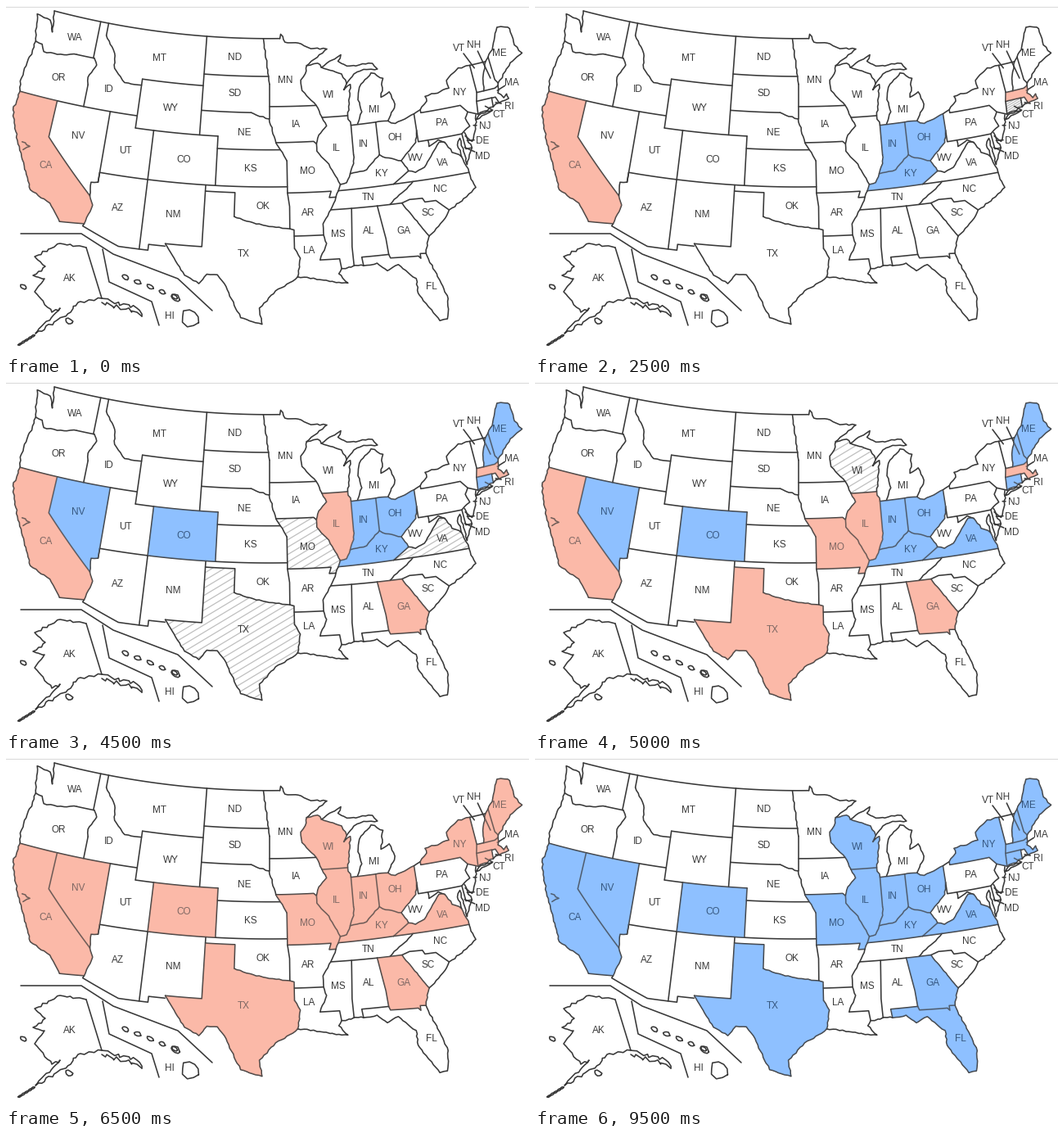
Animation, 639 px wide and 425 px high, one loop 9.6 s. Source, as a matplotlib script:

```python
import math
import random

import matplotlib.pyplot as plt
from matplotlib.animation import FuncAnimation
from matplotlib.collections import LineCollection
from matplotlib.patches import Polygon

W, H, DPI = 639, 425, 100
INK, CORAL, BLUE, GREY = "#383838", "#fbb9a8", "#8ec0ff", "#bfbfbf"
LABEL_INK = {CORAL: "#7d6763", BLUE: "#36577f"}
MERGER, RENAMING = 11, 14

random.seed(4)
arcs = []


def project(lon, lat):
    """Conic map projection from degrees to pixels."""
    angle = math.radians(0.558 * (lon + 96.5))
    radius = 1217 - 15.1 * (lat - 37)
    return 321.5 + radius * math.sin(angle), radius * math.cos(angle) - 996


def screen(x, y):
    return x, y


def draw(owners, points, rough=0.0, place=project):
    """Add a line shared by the states in owners, roughened between its points."""
    line = [place(*points[0])]
    for a, b in zip(points, points[1:]):
        pieces = max(1, round(math.dist(place(*a), place(*b)) / 4))
        for i in range(1, pieces + 1):
            t = i / pieces
            x, y = place(a[0] + (b[0] - a[0]) * t, a[1] + (b[1] - a[1]) * t)
            wobble = rough if i < pieces else 0
            line.append((x + random.uniform(-wobble, wobble), y + random.uniform(-wobble, wobble)))
    arcs.append((owners.split(), line))


def edge(owners, *points):
    draw(owners, points)


def parallel(lat, west, east, owners=""):
    draw(owners, [(west, lat), (east, lat)])


def meridian(lon, north, south, owners=""):
    draw(owners, [(lon, north), (lon, south)])


def river(owners, *points):
    draw(owners, points, 0.7)


def shore(owners, *points):
    draw(owners, points, 1.0)


def island(x, y, size, flat=0.6, tilt=0.5):
    ring = []
    for i in range(9):
        a, k = i * math.tau / 9, size * random.uniform(0.8, 1.15)
        u, v = k * math.cos(a), k * flat * math.sin(a)
        ring.append((x + u * math.cos(tilt) - v * math.sin(tilt),
                     y + u * math.sin(tilt) + v * math.cos(tilt)))
    arcs.append(([], ring + ring[:1]))


# Surveyed lines of the West and the Plains
parallel(49, -122.8, -95.2)
parallel(46, -119, -116.92)
parallel(45.94, -104.05, -96.56)
parallel(45, -111.05, -104.05)
parallel(43.5, -96.45, -91.22)
parallel(43, -104.05, -98.5)
parallel(42, -124.2, -120, "CA")
parallel(42, -120, -114.05, "NV")
parallel(42, -114.05, -111.05)
parallel(41, -111.05, -109.05)
parallel(41, -109.05, -102.05, "CO")
parallel(40, -102.05, -95.3)
parallel(37, -114.05, -109.05)
parallel(37, -109.05, -102.05, "CO")
parallel(37, -102.05, -94.62)
meridian(-117.03, 49, 46)
meridian(-117.03, 43.8, 42)
meridian(-116.05, 49, 48)
meridian(-114.05, 42, 36.2, "NV")
meridian(-114.05, 37, 36.2)
meridian(-111.05, 45, 41)
meridian(-109.05, 41, 37, "CO")
meridian(-109.05, 37, 31.33)
meridian(-104.05, 49, 41)
meridian(-102.05, 41, 37, "CO")
meridian(-103.04, 37, 36.5)
meridian(-96.45, 45.3, 42.5)

# Pacific side
shore("", (-122.8, 49), (-122.4, 47.3), (-123, 48.2), (-124.7, 48.4), (-124, 46.25))
river("", (-124, 46.25), (-123.2, 46.15), (-122.8, 45.6), (-121.2, 45.65), (-119, 46))
shore("", (-124, 46.25), (-124.5, 42.8), (-124.2, 42))
river("", (-116.92, 46), (-116.5, 45.5), (-117.2, 44.4), (-117.03, 43.8))
river("", (-116.05, 48), (-114.7, 46.7), (-114.4, 45.5), (-113, 44.5), (-111.05, 44.5))
shore("CA", (-124.2, 42), (-124.4, 40.4), (-123.7, 39), (-122.4, 37.2), (-121.9, 36.5),
      (-120.6, 34.5), (-118.4, 33.8), (-117.1, 32.5))
shore("", (-122.6, 38.1), (-121.7, 37.9), (-122.3, 37.5))
edge("CA", (-117.1, 32.5), (-114.7, 32.7))
river("CA", (-114.7, 32.7), (-114.2, 34.3), (-114.63, 35))
edge("CA NV", (-114.63, 35), (-120, 39), (-120, 42))
river("NV", (-114.05, 36.2), (-114.75, 36.1), (-114.63, 35))
edge("", (-114.7, 32.7), (-114.8, 32.5), (-111.07, 31.33), (-108.2, 31.33), (-108.2, 31.8), (-106.6, 31.8))

# Texas and the Missouri
edge("TX", (-106.6, 32), (-103.04, 32), (-103.04, 36.5), (-100, 36.5), (-100, 34.56))
river("TX", (-100, 34.56), (-98.1, 34.1), (-96.5, 33.8), (-94.45, 33.6))
edge("TX", (-94.45, 33.6), (-94.04, 33.5), (-94.04, 32))
river("TX", (-94.04, 32), (-93.5, 31.2), (-93.8, 29.7))
shore("TX", (-93.8, 29.7), (-95.9, 28.6), (-97.4, 27.2), (-97.15, 25.9))
river("TX", (-97.15, 25.9), (-99.1, 26.4), (-100.7, 29.1), (-101.4, 29.8), (-102.4, 29.8), (-103.1, 29),
      (-104.5, 29.6), (-106.6, 32))
edge("", (-94.45, 33.6), (-94.43, 35.4), (-94.62, 36.5))
river("", (-98.5, 43), (-97.9, 42.8), (-96.5, 42.5), (-95.77, 40.58))
river("MO", (-95.77, 40.58), (-95.3, 40), (-94.62, 39.1))
meridian(-94.62, 39.1, 36.5, "MO")
river("", (-96.45, 45.3), (-96.56, 45.94), (-97.2, 49))
edge("MO", (-95.77, 40.58), (-91.7, 40.6), (-91.4, 40.4))

# Mississippi
shore("", (-95.2, 49), (-95.1, 49.35), (-94.6, 48.7), (-93, 48.6), (-91.5, 48.1), (-89.6, 48), (-92.1, 46.75))
river("WI", (-92.1, 46.75), (-92.3, 46.1), (-92.85, 45.6), (-92.75, 44.75), (-91.22, 43.5), (-90.64, 42.5))
river("IL", (-90.64, 42.5), (-90.2, 41.8), (-91.1, 41.1), (-91.4, 40.4))
river("MO IL", (-91.4, 40.4), (-91.4, 39.8), (-90.2, 38.7), (-89.15, 37))
river("KY MO", (-89.15, 37), (-89.4, 36.5))
river("MO", (-89.4, 36.5), (-89.7, 36))
edge("MO", (-94.62, 36.5), (-90.15, 36.5), (-90.37, 36), (-89.7, 36))
river("", (-89.7, 36), (-90.3, 35), (-91.15, 33.9), (-91.15, 33), (-90.9, 32.3), (-91.6, 31))
parallel(33, -94.04, -91.15)
edge("", (-91.6, 31), (-89.73, 31), (-89.6, 30.2))
shore("", (-93.8, 29.7), (-92.3, 29.55), (-90.2, 29.1), (-89.1, 29), (-89.9, 29.8), (-89.6, 30.2),
      (-88, 30.35), (-87.5, 30.3))

# Great Lakes and the Ohio
shore("WI", (-92.1, 46.75), (-90.8, 46.9), (-90.4, 46.55))
river("WI", (-90.4, 46.55), (-88.1, 45.9), (-87.6, 45.1))
shore("WI", (-87.6, 45.1), (-88, 44.6), (-87.2, 45), (-87.8, 42.5))
shore("", (-90.4, 46.55), (-88, 47.45), (-88.4, 46.95), (-87.4, 46.5), (-84.4, 46.5), (-83.9, 46),
      (-85.5, 46.1), (-86.7, 45.8), (-87.6, 45.1))
shore("", (-86.8, 41.76), (-86.2, 42.7), (-86.5, 43.7), (-86.2, 44.7), (-84.7, 45.75), (-83.4, 45.2),
      (-83.9, 43.7), (-82.9, 44.05), (-82.45, 43), (-83.45, 41.73))
parallel(42.5, -90.64, -87.8, "WI IL")
shore("IL", (-87.8, 42.5), (-87.53, 41.7))
meridian(-87.53, 41.7, 39.3, "IL IN")
river("IL IN", (-87.53, 39.3), (-87.6, 38.6), (-88.05, 37.8))
river("IL KY", (-88.05, 37.8), (-88.5, 37.1), (-89.15, 37))
edge("IN", (-87.53, 41.7), (-84.8, 41.75))
meridian(-84.8, 41.75, 39.1, "IN OH")
river("IN KY", (-88.05, 37.8), (-86.3, 38), (-85.5, 38.6), (-84.8, 39.1))
river("OH KY", (-84.8, 39.1), (-84.2, 38.8), (-82.6, 38.4))
shore("OH", (-84.8, 41.75), (-83.45, 41.73), (-82.7, 41.45), (-80.52, 42))
meridian(-80.52, 42, 40.64, "OH")
river("OH", (-80.52, 40.64), (-80.8, 39.7), (-81.8, 39), (-82.6, 38.4))

# South
river("KY", (-82.6, 38.4), (-82, 37.5))
edge("KY VA", (-82, 37.5), (-83.7, 36.6))
edge("KY", (-89.4, 36.5), (-83.7, 36.6))
edge("VA", (-83.7, 36.6), (-81.7, 36.6), (-75.87, 36.55))
river("", (-84.32, 35), (-83, 35.8), (-81.7, 36.6))
parallel(35, -90.3, -85.6)
parallel(35, -85.6, -83.1, "GA")
edge("", (-88.2, 35), (-88.45, 31.9), (-88.4, 30.35))
edge("GA", (-85.6, 35), (-85.1, 32.3), (-85, 31))
edge("FL", (-85, 31), (-87.6, 31), (-87.5, 30.3))
edge("GA FL", (-85, 31), (-84.87, 30.7), (-82.2, 30.57), (-82, 30.36), (-82, 30.75), (-81.45, 30.7))
river("GA", (-83.1, 35), (-81.4, 32.7), (-80.9, 32.05))
shore("GA", (-80.9, 32.05), (-81.45, 30.7))
shore("FL", (-81.45, 30.7), (-80.55, 28.4), (-80.05, 26.8), (-80.4, 25.2), (-81.1, 25.15), (-82.7, 27.6),
      (-82.7, 28.8), (-84.2, 30.1), (-85.3, 29.7), (-86.2, 30.4), (-87.5, 30.3))
edge("", (-83.1, 35), (-82.3, 35.2), (-81, 35.15), (-80.8, 34.82), (-79.7, 34.8), (-78.55, 33.87))
shore("", (-75.87, 36.55), (-75.5, 35.25), (-76.6, 34.65), (-78.55, 33.87), (-79.3, 33.1), (-80.9, 32.05))

# Chesapeake to New York
shore("VA", (-75.87, 36.55), (-76.3, 37.9), (-77.2, 38.4), (-77.75, 39.3))
river("VA", (-77.75, 39.3), (-78.35, 39.4), (-80.3, 37.6), (-81.3, 37.3), (-82, 37.5))
river("", (-77.75, 39.3), (-78.4, 39.6), (-79.48, 39.2), (-79.48, 39.72))
edge("", (-80.52, 40.64), (-80.52, 39.72), (-75.8, 39.72), (-75.7, 38.46), (-75.05, 38.45))
shore("", (-75.5, 39.8), (-75.05, 38.45), (-75.9, 37.2), (-76.1, 39.4), (-76.5, 38.9), (-76.3, 37.9))
river("", (-75.8, 39.72), (-74.8, 40.2), (-75.1, 40.9), (-74.7, 41.36))
shore("", (-80.52, 42), (-79.76, 42.25))
edge("NY", (-79.76, 42.25), (-79.76, 42), (-75.35, 42), (-74.7, 41.36), (-73.65, 41))
shore("", (-73.9, 41), (-74, 40.4), (-74.9, 38.95), (-75.5, 39.5))
shore("NY", (-79.76, 42.25), (-78.9, 42.85), (-79, 43.25), (-76.2, 43.55), (-76.3, 44.2), (-74.7, 45), (-73.35, 45))
shore("", (-74, 40.6), (-72, 41.05), (-73.6, 40.9), (-74, 40.6))

# New England
edge("NY", (-73.35, 45), (-73.26, 42.75))
edge("NY MA", (-73.26, 42.75), (-73.5, 42.05))
edge("NY CT", (-73.5, 42.05), (-73.65, 41))
parallel(45, -73.35, -71.5)
river("NH", (-71.5, 45), (-72.1, 44), (-72.46, 42.73))
edge("NH", (-71.5, 45), (-71.08, 45.3))
edge("NH ME", (-71.08, 45.3), (-70.97, 43.4), (-70.7, 43.07))
shore("NH", (-70.7, 43.07), (-70.8, 42.87))
shore("ME", (-71.08, 45.3), (-70.4, 45.8), (-69.2, 47.45), (-68.3, 47.3), (-67.8, 47.07), (-67.8, 45.7),
      (-67.2, 44.9), (-68.8, 44.4), (-70.7, 43.07))
parallel(42.73, -73.26, -72.46, "MA")
edge("MA NH", (-72.46, 42.73), (-71.2, 42.73), (-70.8, 42.87))
shore("MA", (-70.8, 42.87), (-71, 42.3), (-70.5, 41.8), (-70.1, 42.05), (-70, 41.65), (-71.13, 41.5))
edge("MA", (-71.13, 41.5), (-71.38, 42.02), (-71.8, 42.02))
parallel(42.04, -71.8, -73.5, "MA CT")
edge("CT", (-71.8, 42.02), (-71.86, 41.3))
shore("CT", (-71.86, 41.3), (-73.65, 41))
shore("", (-71.86, 41.3), (-71.13, 41.5))

# Insets
draw("", [(18, 278), (92, 278), (131, 303), (210, 333), (252, 372)], place=screen)
draw("", [(118, 297), (126, 337), (178, 361), (187, 390)], place=screen)
draw("", [(98, 295), (117, 357)], place=screen)
draw("", [(98, 295), (66, 290), (35, 306), (48, 318), (33, 329), (47, 333), (35, 349), (56, 374), (66, 369),
          (36, 400), (79, 374), (88, 362), (117, 357)], 1.5, screen)
for drop in (0, 5):
    draw("", [(117, 357 + drop), (160, 369 + drop), (166, 379)], 2.5, screen)
for k in range(5):
    island(17 + 4 * k, 413 - 2.5 * k, 2.5, 0.4, -0.5)
    island(146 + 15 * k, 331 + 6 * k, 4.5 - 0.2 * k)
for place in ((21, 343, 4), (77, 385, 5), (207, 356, 6), (225, 381, 11, 0.9)):
    island(*place)

LABELS = dict(
    WA=(84, 37), OR=(64, 86), ID=(126, 100), MT=(187, 62), WY=(201, 123), NV=(88, 157), CA=(49, 193),
    UT=(146, 175), CO=(217, 186), AZ=(137, 245), NM=(204, 254), ND=(280, 61), SD=(280, 105),
    NE=(291, 153), KS=(299, 197), OK=(314, 243), TX=(290, 302), MN=(341, 89), IA=(354, 144),
    MO=(368, 200), AR=(369, 252), LA=(370, 298), WI=(394, 107), IL=(404, 172), MI=(450, 125),
    IN=(437, 168), OH=(475, 159), KY=(459, 203), TN=(443, 232), MS=(406, 278), AL=(443, 273),
    GA=(486, 273), FL=(520, 341), SC=(516, 251), NC=(531, 222), VA=(533, 190), WV=(500, 184),
    PA=(532, 141), NY=(554, 104), VT=(553, 50), NH=(572, 46), ME=(603, 56), MA=(618, 92),
    RI=(615, 121), CT=(602, 131), NJ=(585, 146), DE=(582, 163), MD=(582, 182), AK=(78, 332), HI=(200, 377))
POINTERS = dict(VT=(-72.9, 44.7), NH=(-71.4, 43.6), MA=(-71, 42.5), RI=(-71.5, 41.6), CT=(-72.7, 41.5),
                NJ=(-74.4, 40.2), DE=(-75.4, 39.1), MD=(-75.8, 38.6))
for name, spot in POINTERS.items():
    (x, y), (tx, ty) = LABELS[name], project(*spot)
    t = 10 / math.dist((x, y), (tx, ty))
    draw("", [(x + (tx - x) * t, y + (ty - y) * t), (tx, ty)], place=screen)

# states, step when hatched, step when coloured, first colour
SCHEDULE = [
    ("CA", 0, 0, CORAL), ("IN", 1, 1, BLUE), ("KY", 1, 2, BLUE), ("OH", 3, 4, BLUE),
    ("MA", 4, 5, CORAL), ("CT", 5, 6, BLUE), ("NH CO NV", 6, 7, BLUE), ("ME", 7, 8, BLUE),
    ("IL", 7, 8, CORAL), ("GA", 8, 9, CORAL), ("MO TX", 9, 10, CORAL), ("VA", 9, 10, BLUE),
    ("WI", 10, 11, CORAL), ("NY", 12, 13, CORAL), ("FL", 14, 15, BLUE)]


def outline(state):
    """Chain a state's lines end to end into one ring."""
    parts = [line for owners, line in arcs if state in owners]
    ring = list(parts.pop(0))
    while parts:
        options = [(math.dist(ring[-1], p[end]), i, end) for i, p in enumerate(parts) for end in (0, -1)]
        _, i, end = min(options)
        part = parts.pop(i)
        ring += part if end == 0 else part[::-1]
    return ring


fig = plt.figure(figsize=(W / DPI, H / DPI), dpi=DPI, facecolor="white")
ax = fig.add_axes([0, 0, 1, 1])
ax.set(xlim=(0, W), ylim=(H, 0))
ax.axis("off")
ax.plot([0, W], [0.5, 0.5], color="#d9d9d9", lw=0.72)
ax.add_collection(LineCollection([line for _, line in arcs], colors=INK, linewidths=1.15,
                                 capstyle="round", joinstyle="round", zorder=3))
labels = {name: ax.text(x, y, name, family="Liberation Sans", size=8.5, color=INK, zorder=5,
                        ha="center", va="center_baseline") for name, (x, y) in LABELS.items()}


class Region:
    def __init__(self, state, hatched, coloured, hue):
        self.hatched, self.coloured, self.hue = hatched, coloured, hue
        self.label = None if state in POINTERS else labels[state]
        ring = outline(state)
        self.fill = ax.add_patch(Polygon(ring, lw=0, zorder=1))
        self.veil = ax.add_patch(Polygon(ring, lw=0, alpha=0.3, zorder=4))
        xs, ys = zip(*ring)
        left, right, top, bottom = min(xs), max(xs), min(ys), max(ys)
        rise = 0.6 * (right - left)
        gap = min(9, (bottom - top) / 7)
        count = int((bottom - top + rise) / gap) + 1
        strokes = [[(left, top + k * gap), (right, top + k * gap - rise)] for k in range(count)]
        self.hatch = ax.add_collection(LineCollection(strokes, colors=GREY, linewidths=0.9, zorder=2))
        self.hatch.set_clip_path(self.fill)

    def show(self, step):
        active = step >= self.coloured
        hue = self.hue if step < MERGER else CORAL if step < RENAMING else BLUE
        self.hatch.set_visible(self.hatched <= step < self.coloured)
        for patch in (self.fill, self.veil):
            patch.set_visible(active)
            patch.set_facecolor(hue)
        if self.label:
            self.label.set_color(LABEL_INK[hue] if active else INK)


regions = [Region(state, *rest) for states, *rest in SCHEDULE for state in states.split()]


def update(frame):
    for region in regions:
        region.show(frame // 5)
    return []


anim = FuncAnimation(fig, update, frames=96, interval=100, repeat=True, repeat_delay=0)
plt.show()
```
